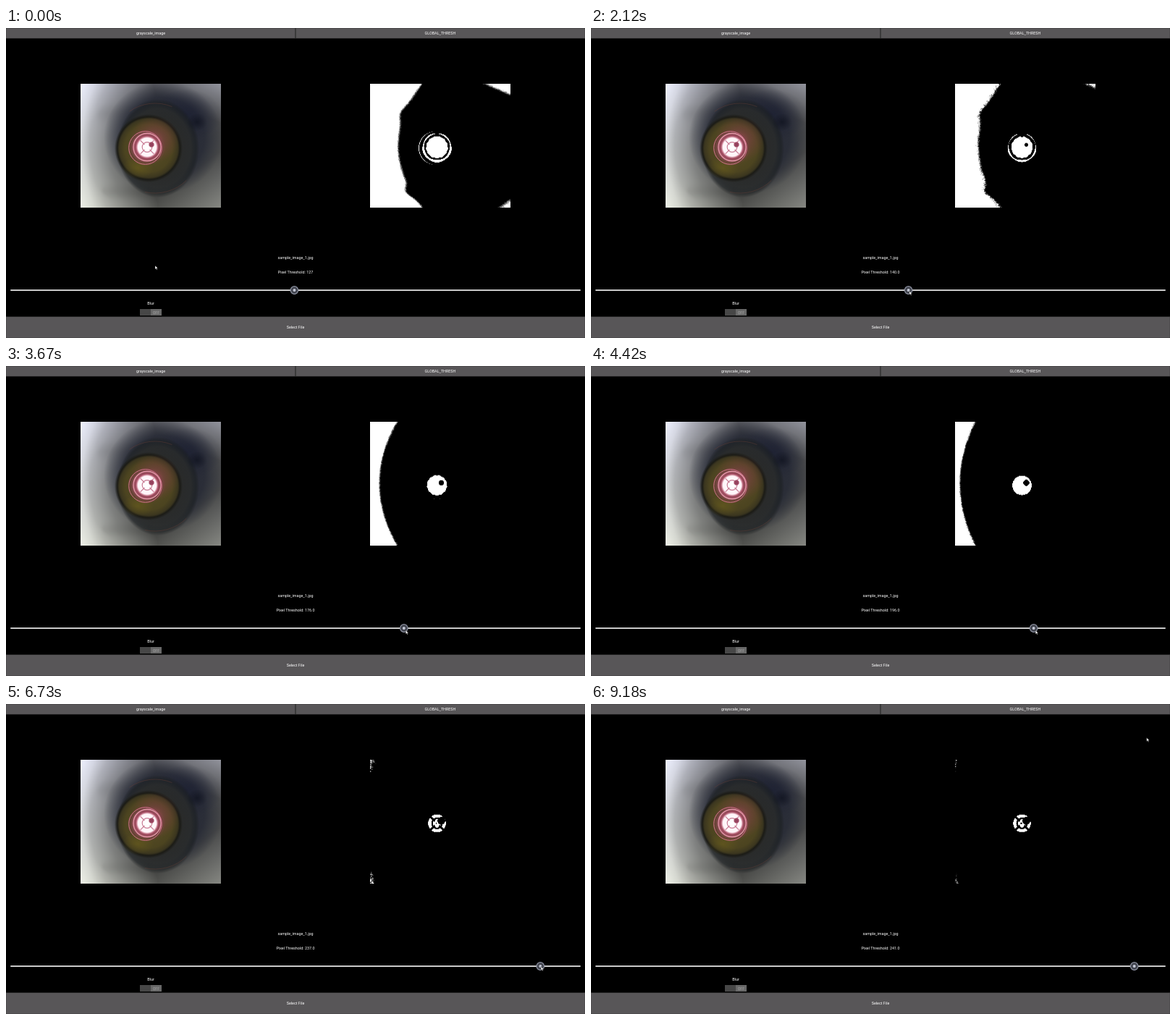
These frames come from a looping animation (800 by 428 pixels, 9.21 s). An HTML page with a canvas:

```html
<!DOCTYPE html>
<html lang="en">
<head>
<meta charset="utf-8">
<title>Threshold demo</title>
<style>
  html, body { margin: 0; width: 800px; height: 428px; overflow: hidden; background: #000; }
  canvas, svg { position: absolute; left: 0; top: 0; display: block; }
  text { font: 5.4px Roboto, sans-serif; fill: #fff; text-anchor: middle; }
</style>
</head>
<body>
<canvas id="stage" width="800" height="428"></canvas>
<svg width="800" height="428" viewBox="0 0 800 428">
  <g fill="#585658" stroke="#303030" stroke-width=".5">
    <rect width="399.8" height="14.2"/>
    <rect x="400.2" width="399.8" height="14.2"/>
    <rect y="398.7" width="800" height="29.3"/>
  </g>
  <text x="200" y="9.4">grayscale_image</text>
  <text x="600" y="9.4">GLOBAL_THRESH</text>
  <text x="400" y="319.4">sample_image_1.jpg</text>
  <text x="400" y="339.1" id="label"></text>
  <text x="200" y="382">Blur</text>
  <text x="400" y="415.2">Select File</text>
  <rect x="185" y="388" width="30" height="9" fill="#474747"/>
  <rect x="200" y="388" width="15" height="9" fill="#686868"/>
  <text x="207.5" y="394.6" style="fill:#aaa">OFF</text>
  <rect x="6" y="361" width="788" height="2" rx="1" fill="#c9c9c9"/>
  <g id="knob">
    <circle r="5.3" fill="#42454f" stroke="#8d91a0" stroke-width="1.2"/>
    <circle r="2" fill="#c4c8d6"/>
  </g>
  <path id="cursor" d="M0 0V5.2L1.3 4.1L2.2 6.1L3.1 5.7L2.2 3.8H3.9Z" fill="#fff" stroke="#000" stroke-width=".4"/>
</svg>
<script>
const W = 194, H = 171, LOOP = 9210, { PI, sin, cos, abs, exp, hypot, min, max } = Math;
const ctx = document.getElementById('stage').getContext('2d');
const [label, knob, cursor] = ['label', 'knob', 'cursor'].map(id => document.getElementById(id));

// Piecewise linear value through [key, value] points
function track(points, t) {
  const i = points.findIndex(p => t <= p[0]);
  if (i === 0) return points[0][1];
  if (i < 0) return points[points.length - 1][1];
  const [a, b] = [points[i - 1], points[i]];
  return a[1] + (b[1] - a[1]) * (t - a[0]) / (b[0] - a[0]);
}

const bump = (y, mid, width) => exp(-(((y - mid) / width) ** 2));

// Brightness along one row: each level lies on a parabola, the darker two with dents
function rowProfile(y) {
  const q = (y - 85) ** 2 / 1000;
  const dent = 6 * bump(y, 40, 12) + 8 * bump(y, 149, 9);
  const bright = 2.5 * q, edge = 38 + 4.6 * q - dent;
  return [[-.01, 216 + bright * 1.38], [bright, 216], [12 + 3.4 * q, 176],
    [25 + 3.7 * q - dent, 153], [edge, 127], [edge + 45, 72]];
}

function backdrop(profile, x, y) {
  const top = ((x - 159) * 15 - y * 35) / 38;
  const bottom = ((x - 179) * 11 + (y - 171) * 15) / 18.6;
  return max(track(profile, x), 127 + 1.5 * top, 127 + bottom);
}

// Brightness of the lit lens, relative to its centre
function lens(x, y) {
  const r = hypot(x, y), a = Math.atan2(y, x);
  let v = min(255, 216 + (12.8 - r) * 40 + (r > 13.3 ? 14 * sin(a * 13) : 0));
  if (r < 14) {
    const spoke = r > 4.5 ? min(abs(x - y), abs(x + y)) / 1.41 : 9;
    const hole = max(135, 153 + (hypot(x - 6, y + 3.5) - 3) * 37);
    v = min(v, 205 + abs(r - 6.8) * 30, 200 + spoke * 25, 212 + hypot(x + 1, y) * 25, hole);
  }
  const ring = 158 + 15 * sin(a) + 9 * sin(a * 5) - 28 * abs(r - 19);
  const arc = 125 - 11 * cos(a) - 20 * abs(hypot(x + 2, y - 1) - 23);
  return max(v, ring, arc);
}

// Triangular noise, stronger where the sensor is noisy
function noise(x, y, v) {
  const h = k => { const s = sin(x * 12.9898 + y * 78.233 + k) * 43758.5453; return s - Math.floor(s); };
  const amp = 1.5 + 7 * bump(v, 153, 12) + 7 * bump(v, 235, 30);
  return amp * (h(0) + h(5) - 1);
}

const buffer = document.createElement('canvas');
buffer.width = W;
buffer.height = H;
const bufferCtx = buffer.getContext('2d');
const pixels = bufferCtx.createImageData(W, H);

// Fills a picture from a function of x, y and index, and places it
function paint(left, shade) {
  for (let i = 0; i < W * H; i++) pixels.data.set([...shade(i % W, i / W | 0, i), 255], i * 4);
  bufferCtx.putImageData(pixels, 0, 0);
  ctx.fillRect(left - 1, 75, W + 2, H + 3);
  ctx.drawImage(buffer, left, 76.6, 193.3, 171.2);
}

const field = new Float32Array(W * H);
const profiles = Array.from({ length: H }, (_, y) => rowProfile(y));

function glow(x, y, rx, ry, ...stops) {
  ctx.save();
  ctx.translate(x, y);
  ctx.scale(rx, ry);
  const g = ctx.createRadialGradient(0, 0, 0, 0, 0, 1);
  stops.forEach(([p, c]) => g.addColorStop(p, c));
  ctx.fillStyle = g;
  ctx.fillRect(-1, -1, 2, 2);
  ctx.restore();
}

function ring(x, y, r, color, width, from = 0, to = 7) {
  ctx.beginPath();
  ctx.arc(x, y, r, from, to);
  ctx.strokeStyle = color;
  ctx.lineWidth = width;
  ctx.stroke();
}

function drawPhoto() {
  paint(103.3, (x, y, i) => {
    const v = backdrop(profiles[y], x, y);
    field[i] = max(v + noise(x, y, v), lens(x - 92, y - 87.5));
    return [v * .99, v, v * (1.06 - .1 * y / H)];
  });
  ctx.save();
  ctx.beginPath();
  ctx.rect(103.3, 76.6, 193.3, 171.2);
  ctx.clip();

  // Shadow and outer barrel
  glow(217, 151, 82, 78, [0, '#1e212ee0'], [.7, '#1e2230b0'], [1, '#1e223000']);
  glow(250, 120, 48, 36, [0, '#181c30a0'], [1, '#181c3000']);
  glow(210, 166, 57, 68, [0, '#2b2a24'], [.8, '#292b2be0'], [.92, '#1c2022a0'], [1, '#181a1b00']);
  glow(264, 130, 14, 12, [0, '#0c0f1aa0'], [1, '#0c0f1a00']);
  for (const from of [.8, 4.1]) ring(206, 166, 62, '#6b433866', 1, from, from + 1);

  // Inner disc
  glow(197, 166, 47, 47, [0, '#594e26'], [.7, '#4c4420'], [.86, '#3b361f'], [.92, '#1b1b16'], [1, '#1b1b1600']);
  glow(182, 193, 22, 15, [0, '#6f621c80'], [1, '#6f621c00']);
  glow(205, 154, 34, 32, [0, '#a84b5cc0'], [.4, '#84404a80'], [1, '#80404000']);

  // Lit lens
  glow(194, 165, 26, 25, [0, '#ef8aa6'], [.65, '#a8566ae0'], [.85, '#7c404890'], [1, '#85404a00']);
  ring(192.5, 165.5, 22.8, '#d0728a', 1);
  ring(195, 164.5, 19, '#e898ac', 1.3);
  ring(195, 164.5, 16.4, '#9c3e59', 1);
  glow(195, 164.5, 15.5, 15.5, [0, '#fff'], [.82, '#fff4f8'], [1, '#f5a4bd00']);
  ring(195, 164.5, 6.8, '#c97f97', 1.2);
  for (let a = PI / 4; a < 2 * PI; a += PI / 2) {
    ctx.beginPath();
    ctx.moveTo(195 + 5 * cos(a), 164.5 + 5 * sin(a));
    ctx.lineTo(195 + 13 * cos(a), 164.5 + 13 * sin(a));
    ctx.stroke();
  }
  glow(201, 161, 4.2, 4.2, [0, '#8d3c58'], [.7, '#a04b66'], [1, '#a04b6600']);
  ctx.restore();
}

function drawMask(level) {
  paint(503.3, (x, y, i) => Array(3).fill((field[i] - level) * 60 + 128));
}

const levels = [[1540, 127], [1580, 128], [2730, 153], [3670, 176], [5210, 216], [6200, 237], [6730, 237], [7400, 241]];

function pointer(t, knobX) {
  if (t < 1500) {
    // Dips over the button on the way to the knob
    const p = min(1, max(0, t - 100) / 840);
    return [206 + 194 * p, 328 + 35 * p + 70 * sin(PI * p)];
  }
  if (t < 8100) {
    const sag = max(0, sin(PI * (t - 1500) / 5500));
    return [knobX + .5 + 2 * sag, 362 + 3 * sag];
  }
  const p = min(1, (t - 8100) / 1000);
  return [knobX + 1 + 16 * p + 16 * sin(PI * p), 362 - 315.5 * sin(PI / 2 * p) ** 1.5];
}

let shown = 0;
function frame(now) {
  const t = now % LOOP;
  const level = Math.round(track(levels, t));
  const knobX = 6 + 3.09 * level;
  if (level !== shown) {
    drawMask(level);
    label.textContent = 'Pixel Threshold: ' + (level === 127 ? level : level.toFixed(1));
    knob.setAttribute('transform', `translate(${knobX} 362)`);
    shown = level;
  }
  cursor.setAttribute('transform', `translate(${pointer(t, knobX)})`);
  requestAnimationFrame(frame);
}

drawPhoto();
frame(performance.now());
</script>
</body>
</html>
```
